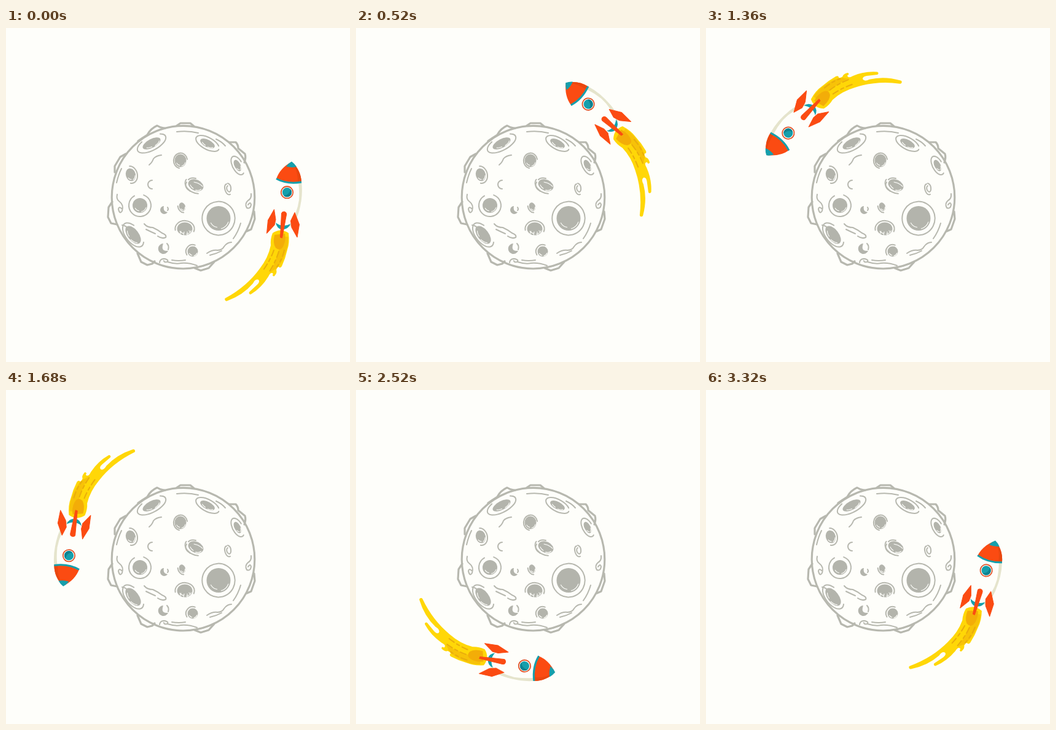
These frames come from a looping animation (560 by 544 pixels, 3360 ms). An HTML page:

```html
<!DOCTYPE html>
<html lang="en">
<head>
<meta charset="utf-8">
<title>Rocket around the moon</title>
<style>
html, body { margin: 0; width: 100%; height: 100%; overflow: hidden; background: #fefefa; }
svg { display: block; width: 560px; height: 544px; }
#moon { fill: none; stroke: #b7b8af; stroke-width: 2; stroke-linecap: round; stroke-linejoin: round; }
#moon .rim { stroke-width: 3.2; }
#moon .pit { fill: #b3b4ac; stroke: none; }
#moon .cut { stroke: #fefefa; stroke-width: 1.1; }
</style>
</head>
<body>
<svg viewBox="0 0 560 544">
  <g id="moon">
    <g class="rim">
      <circle cx="288.5" cy="275.7" r="116.3"/>
      <path d="M215 184Q222 179 230 174Q235 164 246 159Q252 163 259 163"/>
      <path d="M278 159L284 155L300 155L306 160"/>
      <path d="M363 186L374 186Q378 190 378 196L389 205Q391 211 388 219"/>
      <path d="M404 299L405 311L399 328L392 331"/>
      <path d="M307 391L317 395L330 391L339 381"/>
      <path d="M214 367L220 381L230 386L238 384L242 380"/>
      <path d="M173 283L167 292L166 308L171 318L181 320"/>
      <path d="M177 235L177 225L186 210L195 205"/>
    </g>
    <g id="craters"></g>
    <!-- ridges and loose strokes -->
    <path d="M233 223Q238 219 240 213Q244 208 253 207"/>
    <path d="M238 248A7 7 0 1 0 238 262"/>
    <path d="M225 319Q230 325 239 325Q248 329 254 334Q262 337 260 341Q254 344 247 339"/>
    <path d="M228 328Q236 332 243 335"/>
    <path d="M181 271Q179 279 185 283Q192 288 189 298Q185 304 183 295Q184 290 188 294"/>
    <path d="M180 252Q183 239 188 229"/>
    <path d="M399 270Q400 278 394 281Q388 286 392 293Q398 295 399 288Q398 282 394 288"/>
    <path d="M327 367Q336 361 344 362Q352 362 355 356Q360 349 367 349"/>
    <path d="M332 370Q342 368 351 363"/>
    <path d="M250 382Q251 375 259 376Q266 378 262 381Q257 382 257 379"/>
    <path d="M263 381Q276 385 285 383Q298 382 311 387M270 378Q281 380 292 378"/>
    <path d="M278 169Q297 167 313 171M342 181Q351 185 357 192"/>
    <path d="M202 329Q194 321 189 321M382 318Q378 332 370 343"/>
  </g>

  <g id="rocket">
    <path fill="#ffd707" d="M434 334Q430 344 431 354Q427 374 413 392Q392 421 358 439.5A2.5 2.5 0 0 0 360 444.5Q386 435 402 416Q406 408 411 410Q414 413 409 418L396 430A2.4 2.4 0 0 0 399 433.5Q416 423 427 405Q430 398 433 399Q436 400 434 402A2 2 0 0 0 437 404Q442 398 440 394Q443 387 445 390Q447 391 449 388Q455 375 458 361Q462 350 460 334Q447 325 434 334Z"/>
    <path fill="#f7c208" d="M459 340Q460 352 456 363Q451 379 443 389Q440 390 439 393Q433 394 429 400Q437 386 441 371Q447 357 448 340Z"/>
    <path fill="#f3ad08" d="M437 337Q434 351 439 358Q447 365 452 354Q456 345 454 335Z"/>
    <g fill="none" stroke="#e9ad0c" stroke-width="2" stroke-linecap="round" stroke-dasharray="10 5 5 5">
      <path d="M436 362Q430 379 417 397"/>
      <path d="M444 364Q439 381 428 398"/>
      <path d="M453 362Q449 378 441 389"/>
    </g>
    <path fill="#fefefa" d="M440 246Q434 282 439 321Q450 328 464 322Q481 294 481 252Z"/>
    <path fill="#e5e4cc" d="M476 252L481 251Q484 273 477 299Q473 313 465 323L460 323Q474 303 477 280Q478 265 476 252Z"/>
    <path fill="#159fac" d="M439 317Q450 326 463 319Q460 328 449 328Q441 327 439 317Z"/>
    <path fill="#fb4b12" d="M465 218Q446 228 440 246Q459 255 481 251Q480 231 465 218Z"/>
    <path fill="#e9470f" d="M465 218Q480 231 481 251L475 252Q476 233 465 218Z"/>
    <path fill="#159fac" d="M465 217.5Q460 220 456 225.5Q465 228 473 226Q470 221 465 217.5Z"/>
    <path fill="none" stroke="#159fac" stroke-width="3" d="M440 245.5Q458 255 481 251"/>
    <circle cx="457.5" cy="267.7" r="9.7" fill="#fefefa" stroke="#e2562c" stroke-width="1.8"/>
    <circle cx="457.5" cy="267.7" r="7.6" fill="#159fac"/>
    <path fill="#0d8190" d="M463 262.5A7.6 7.6 0 0 1 452 273Q461 273 463 262.5Z"/>
    <g fill="#fb4b12" stroke="#fb4b12" stroke-linejoin="round">
      <path d="M436.5 295.5L426.5 313L424.5 334.5L437 321L439 312Z"/>
      <path d="M470 300.5L463.5 314L465 325L474 341L477.5 320Z"/>
      <path d="M448.5 302Q449 299 453 299Q457 300 456.5 304L449.5 342L446.5 341Z"/>
    </g>
  </g>
</svg>
<script>
const NS = "http://www.w3.org/2000/svg";
const craters = document.getElementById("craters");
const rocket = document.getElementById("rocket");

function add(parent, tag, attrs) {
  const el = document.createElementNS(NS, tag);
  for (const key in attrs) el.setAttribute(key, attrs[key]);
  return parent.appendChild(el);
}

// x, y, rx, ry, tilt of the pit, size of the ring, ring start and end in degrees
const pits = [
  [237, 188, 16, 7, -28, 1.6, -40, 240],
  [328, 188, 13, 6, 28, 1.6, 0, 330],
  [284, 216, 9.5, 10.5, 0, 1.18, 100, 350],
  [203, 239, 8, 10.5, -15, 1.35, -80, 110],
  [377, 224, 5, 10, -28, 1.65, 70, 350],
  [309, 256, 13, 9, 24, 1.4, 60, 190],
  [218, 289, 12, 12, 0, 1.5, -70, 240],
  [346, 310, 19.5, 20, 0, 1.37, 0, 359],
  [291, 327, 12.5, 10.5, 0, 1.25, 170, 380],
  [207, 337, 17, 9, 52, 1.35, -30, 240],
  [304, 364, 8.5, 8.5, 0, 1.3, 150, 290],
  [287, 291, 5, 7, -20, 1.4, 100, 200]
];

for (const [x, y, rx, ry, tilt, ring, from, to] of pits) {
  const g = add(craters, "g", { transform: `translate(${x} ${y}) rotate(${tilt})` });
  const at = (deg, k) => {
    const a = deg * Math.PI / 180;
    return `${rx * k * Math.cos(a)} ${ry * k * Math.sin(a)}`;
  };
  add(g, "ellipse", { rx, ry, class: "pit" });
  const large = to - from > 180 ? 1 : 0;
  add(g, "path", { d: `M${at(from, ring)}A${rx * ring} ${ry * ring} 0 ${large} 1 ${at(to, ring)}` });
  // hatching along the lower edge
  for (const [k, a, b] of [[0.87, 20, 75], [0.74, 100, 150]]) {
    add(g, "path", { class: "cut", d: `M${at(a, k)}A${rx * k} ${ry * k} 0 0 1 ${at(b, k)}` });
  }
}

for (const d of [
  "M257 290A6.5 6.5 0 1 0 263 300Q255 299 257 290Z",
  "M256 351A8.5 8.5 0 1 0 264 363Q251 364 256 351Z"
]) add(craters, "path", { d, class: "pit" });

for (const d of [
  "M263 292Q265 295 263 297M262 351Q266 355 264 361",
  "M359 254Q354 256 357 265Q360 273 365 271M361 253Q367 255 366 264Q364 270 360 264Q358 259 361 257",
  "M297 247Q301 243 309 245M294 251Q289 259 300 266"
]) add(craters, "path", { d });

add(craters, "path", { class: "pit", fill: "none", d: "M333 298Q343 287 357 294Q347 293 333 298Z" });
add(craters, "path", { class: "cut", d: "M283 336L285 331M289 338L290 332M295 337L295 332M300 333L298 330M306 251Q314 252 320 258" });

const STEP = 40, STEPS = 84, TURN = 360 / 85;

function draw() {
  const step = Math.floor(performance.now() / STEP) % STEPS;
  rocket.setAttribute("transform", `rotate(${-step * TURN} 280 272)`);
  requestAnimationFrame(draw);
}
draw();
</script>
</body>
</html>
```
